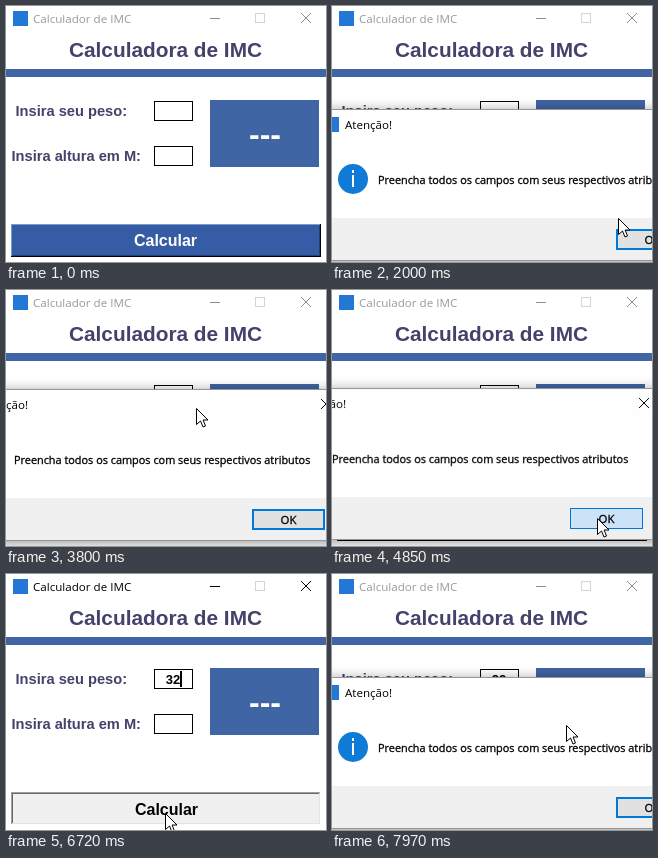
Write an HTML page with a canvas that moves like this. It is 320 px wide and 256 px high and loops after 8 s.

```html
<!DOCTYPE html>
<html lang="pt">
<head>
<meta charset="utf-8">
<title>Calculador de IMC</title>
<style>
html, body { margin: 0; width: 100%; height: 100%; overflow: hidden; background: #fff; }
canvas { display: block; width: 320px; height: 256px; }
</style>
</head>
<body>
<canvas id="stage" width="320" height="256"></canvas>
<script>
const DIALOG = { x: -16, y: 104, w: 396, h: 150 };
const OK_BUTTON = { x: 300, y: 119, w: 73, h: 21 };
const CALC_BUTTON = { x: 5, y: 218, w: 310, h: 33 };

const stage = document.getElementById('stage').getContext('2d');
const layer = Object.assign(document.createElement('canvas'),
  { width: DIALOG.w + 2, height: DIALOG.h + 2 }).getContext('2d');
let ctx = stage;

const LOOP = 8000, PRESS_TIME = 130;
const PRESS_1 = 670, CLOSE = 4850, FOCUS = 5270, TYPE_3 = 5610, TYPE_2 = 5890, PRESS_2 = 6720;
const DRAG_START = 2420, DRAG_END = 4080;
const UI = '"Open Sans", "Noto Sans", sans-serif';
const ARIAL = '"Liberation Sans", Arial, sans-serif';
const INK = '#42426b', BLUE = '#4065a4', BUTTON_BLUE = '#355ca5', ACCENT = '#0078d7';

const spot = {
  below: [215, 262], calcRight: [235, 221], ok: [299, 231], grab: [229, 122],
  dragRight: [245, 118], dragUp: [215, 111], dragLeft: [191, 118], drop: [183, 117],
  droppedOk: [266, 228], entry: [170, 117], calcMiddle: [160, 239], away: [235, 151]
};

// Pointer moves: start, end, destination
const moves = [
  [150, 340, spot.calcRight],
  [950, 1450, spot.ok],
  [1900, 2280, spot.grab],
  [DRAG_START, 2890, spot.dragRight],
  [2890, 3250, spot.dragUp],
  [3250, 3800, spot.dragLeft],
  [3800, DRAG_END, spot.drop],
  [DRAG_END, 4480, spot.droppedOk],
  [4920, 5380, spot.entry],
  [5700, 6350, spot.calcMiddle],
  [6800, 7450, spot.ok],
  [7760, 7970, spot.away]
];

const clamp = v => Math.max(0, Math.min(1, v));
const progress = (t, start, end) => clamp((t - start) / (end - start));
const smooth = p => p * p * (3 - 2 * p);
const between = (t, a, b) => t >= a && t < b;
const inside = ([px, py], { x, y, w, h }) => between(px, x, x + w) && between(py, y, y + h);

function pointerAt(t) {
  let [x, y] = spot.below;
  for (const [start, end, [toX, toY]] of moves) {
    const p = smooth(progress(t, start, end));
    x += (toX - x) * p;
    y += (toY - y) * p;
  }
  return [Math.round(x), Math.round(y)];
}

function rect(x, y, w, h, color) {
  ctx.fillStyle = color;
  ctx.fillRect(x, y, w, h);
}

function frame(x, y, w, h, color, line = 1) {
  ctx.strokeStyle = color;
  ctx.lineWidth = line;
  ctx.strokeRect(x + line / 2, y + line / 2, w - line, h - line);
}

function text(str, x, y, font, color, align = 'left', thicken = 0) {
  ctx.font = font;
  ctx.fillStyle = ctx.strokeStyle = color;
  ctx.textAlign = align;
  ctx.fillText(str, x, y);
  if (thicken) {
    ctx.lineWidth = thicken;
    ctx.strokeText(str, x, y);
  }
}

function closeGlyph(x, y, color) {
  ctx.beginPath();
  for (const side of [-5, 5]) {
    ctx.moveTo(x - side, y - 5);
    ctx.lineTo(x + side, y + 5);
  }
  ctx.strokeStyle = color;
  ctx.lineWidth = 1;
  ctx.stroke();
}

function appIcon(x, y) {
  rect(x, y, 15, 15, '#2278d4');
}

function titleBar(active) {
  appIcon(7, 5);
  text('Calculador de IMC', 27, 17, `11.6px ${UI}`, active ? '#000' : '#999');
  const glyph = active ? '#000' : '#8c8c8c';
  rect(204, 12, 10, 1, glyph);
  frame(249, 7, 10, 10, '#d4d4d4');
  closeGlyph(300, 12, glyph);
}

function bevel({ x, y, w, h }, layers) {
  layers.forEach(([topLeft, bottomRight], i) => {
    rect(x + i, y + i, w - 2 * i, h - 2 * i, bottomRight);
    rect(x + i, y + i, w - 2 * i - 1, h - 2 * i - 1, topLeft);
  });
}

const calcStyles = {
  normal: { edges: [['#7d9ad0', '#000'], [BUTTON_BLUE, '#233f73']], face: BUTTON_BLUE, ink: '#fff', shift: 0 },
  hover: { edges: [['#fff', '#696969'], ['#f0f0f0', '#a0a0a0']], face: '#f0f0f0', ink: '#000', shift: 0 },
  pressed: { edges: [['#a0a0a0', '#fff'], ['#696969', '#e3e3e3']], face: '#f0f0f0', ink: '#000', shift: 1 }
};

function calcButton(state) {
  const { edges, face, ink, shift } = calcStyles[state], { x, y, w, h } = CALC_BUTTON;
  bevel(CALC_BUTTON, edges);
  rect(x + 2, y + 2, w - 4, h - 4, face);
  text('Calcular', 159.5 + shift, 240 + shift, `bold 16px ${ARIAL}`, ink, 'center');
}

function weightEntry(t) {
  const weight = t < TYPE_3 ? '' : t < TYPE_2 ? '3' : '32';
  frame(148, 95, 39, 20, '#000');
  text(weight, 167, 110, `bold 13px ${ARIAL}`, '#000', 'center');
  if (between(t, FOCUS, PRESS_2 + PRESS_TIME)) {
    rect(Math.round(166.5 + ctx.measureText(weight).width / 2), 97, 2, 16, '#000');
  }
}

function mainWindow(t, pointer) {
  rect(0, 0, 320, 256, '#fff');
  const pressed = [PRESS_1, PRESS_2].some(start => between(t, start, start + PRESS_TIME));
  const reopened = between(t, CLOSE + 50, PRESS_2);
  titleBar(pressed || reopened);
  text('Calculadora de IMC', 159.5, 51, `bold 20.8px ${ARIAL}`, INK, 'center');
  rect(0, 63, 320, 8, BLUE);

  const label = `bold 14.67px ${ARIAL}`;
  text('Insira seu peso:', 9.5, 110, label, INK);
  text('Insira altura em M:', 5.5, 155, label, INK);
  weightEntry(t);
  frame(148, 140, 39, 20, '#000');

  rect(204, 94, 109, 67, BLUE);
  text('---', 259, 139, `bold 32px ${ARIAL}`, '#fff', 'center');

  const hover = (t < PRESS_1 || reopened) && inside(pointer, CALC_BUTTON);
  calcButton(pressed ? 'pressed' : hover ? 'hover' : 'normal');
}

function dialogOpacity(t) {
  if (between(t, CLOSE, PRESS_2)) return 1 - progress(t, CLOSE, CLOSE + 200);
  const start = (t < CLOSE ? PRESS_1 : PRESS_2) + 70;
  return 1 - (1 - progress(t, start, start + 307)) ** 2;
}

function dialogOffset(t) {
  if (!between(t, DRAG_START, PRESS_2)) return [0, 0];
  const [x, y] = pointerAt(Math.min(t, DRAG_END));
  return [x - spot.grab[0], y - spot.grab[1]];
}

function dialogFace(hover, pressed) {
  const { w, h } = DIALOG;
  ctx = layer;
  ctx.setTransform(1, 0, 0, 1, 1, 1);
  rect(-1, -1, w + 2, h + 2, '#969696');
  rect(0, 0, w, h, '#fff');
  rect(0, 108, w, h - 108, '#f0f0f0');

  appIcon(8, 7);
  text('Atenção!', 29, 19, `11.6px ${UI}`, '#000');
  closeGlyph(374, 14, '#000');

  ctx.beginPath();
  ctx.arc(37, 69, 15, 0, Math.PI * 2);
  ctx.fillStyle = '#0f7bd7';
  ctx.fill();
  rect(36, 60, 2, 3, '#fff');
  rect(36, 65, 2, 12, '#fff');
  text('Preencha todos os campos com seus respectivos atributos', 62, 74, `10.9px ${UI}`, '#000', 'left', 0.3);

  const { x, y, w: okW, h: okH } = OK_BUTTON;
  rect(x, y, okW, okH, pressed ? '#cce4f7' : hover ? '#e5f1fb' : '#e1e1e1');
  frame(x, y, okW, okH, ACCENT, hover ? 1 : 2);
  text('OK', x + okW / 2, y + 15, `11.4px ${UI}`, '#000', 'center', 0.3);
  ctx = stage;
}

function dialog(t, pointer) {
  const opacity = dialogOpacity(t);
  if (opacity <= 0) return;
  const { w, h } = DIALOG, scale = 1 - 0.06 * (1 - opacity);
  const [dx, dy] = dialogOffset(t);
  const left = DIALOG.x + dx, top = DIALOG.y + dy;
  const hover = inside([pointer[0] - left, pointer[1] - top], OK_BUTTON);
  dialogFace(hover, between(t, CLOSE, CLOSE + 70));

  ctx.save();
  ctx.globalAlpha = opacity;
  ctx.shadowColor = 'rgba(0,0,0,.42)';
  ctx.shadowBlur = 13;
  ctx.shadowOffsetY = 2;
  ctx.translate(left + w / 2, top + h / 2);
  ctx.scale(scale, scale);
  ctx.drawImage(layer.canvas, -w / 2 - 1, -h / 2 - 1);
  ctx.restore();
}

const arrowShape = new Path2D('M0 0V16L4 12.5L6.5 18.5L9 17.5L6.6 11.5H11.5Z');

function arrow([x, y]) {
  ctx.save();
  ctx.translate(x - 0.5, y + 0.5);
  ctx.fillStyle = '#fff';
  ctx.fill(arrowShape);
  ctx.strokeStyle = '#000';
  ctx.lineWidth = 1;
  ctx.stroke(arrowShape);
  ctx.restore();
}

const origin = performance.now();
function tick() {
  const t = (performance.now() - origin) % LOOP, pointer = pointerAt(t);
  mainWindow(t, pointer);
  dialog(t, pointer);
  arrow(pointer);
  requestAnimationFrame(tick);
}
tick();
</script>
</body>
</html>
```
